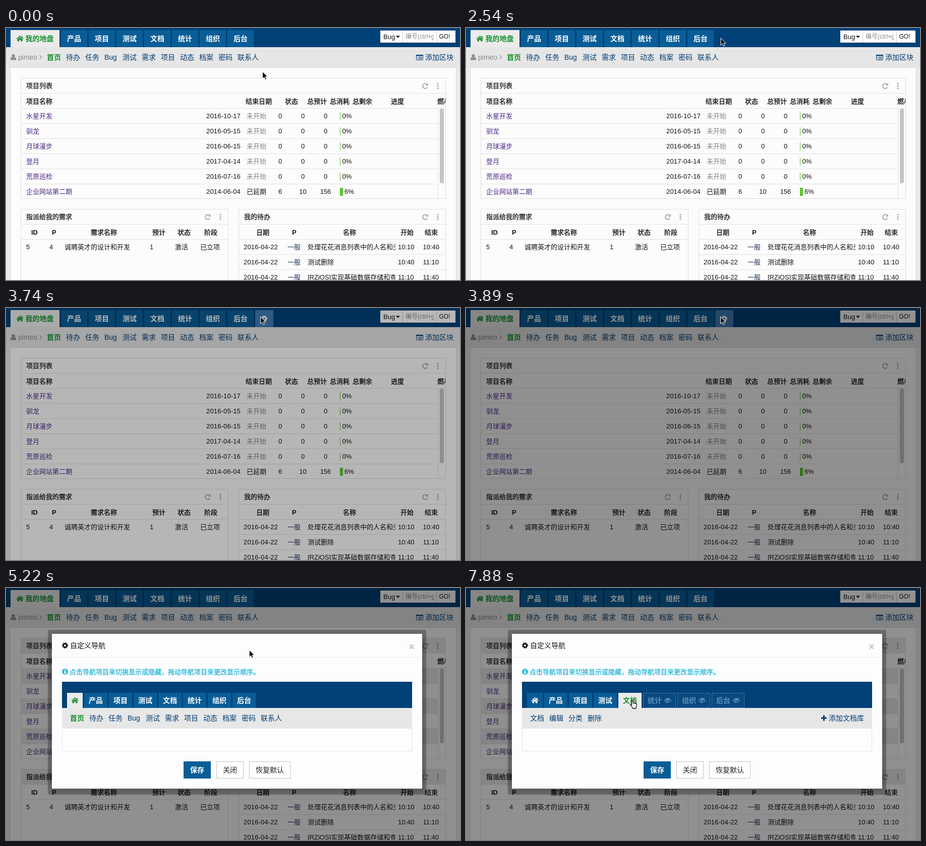
An HTML page that plays this animation: 900 by 500 pixels, repeating every 8 s.

```html
<!DOCTYPE html>
<html lang="zh-CN">
<head>
<meta charset="utf-8">
<title>自定义导航</title>
<style>
html, body { margin: 0; width: 100%; height: 100%; overflow: hidden; background: #ebebeb; }
svg { display: block; width: 900px; height: 500px; }
text { font-family: "Liberation Sans", "Noto Sans CJK SC", "Noto Sans CJK", sans-serif; white-space: pre; }
</style>
</head>
<body>
<svg id="stage" viewBox="0 0 900 500" xmlns="http://www.w3.org/2000/svg"></svg>
<script>
const LOOP = 8000;
const NAVY = '#003d73', BLUE = '#085d97', GREEN = '#17912f', INK = '#141414', LINK = '#4b2a85';
const LINE = '#e2e2e2', ICON = '#a8a8a8';

// Drawing helpers; text is placed by its vertical centre.
const text = (x, y, s, fill = INK, size = 13, more = '') =>
  `<text x="${x}" y="${y + size * 0.37}" fill="${fill}" font-size="${size}" ${more}>${s}</text>`;
const bold = (x, y, s, fill = INK, size = 13) => text(x, y, s, fill, size, 'font-weight="700"');
const semi = (x, y, s, fill = INK, size = 13) => text(x, y, s, fill, size, `stroke="${fill}" stroke-width=".35"`);
const mid = (x, y, s) => text(x, y, s, INK, 13, 'text-anchor="middle"');
const date = (x, y, s) => text(x, y, s, INK, 13, 'letter-spacing=".15"');
const rect = (x, y, w, h, fill, more = '') =>
  `<rect x="${x}" y="${y}" width="${w}" height="${h}" fill="${fill}" ${more}/>`;
const frame = (x, y, w, h, stroke, fill = 'none', more = '') =>
  rect(x + 0.5, y + 0.5, w - 1, h - 1, fill, `stroke="${stroke}" ${more}`);
const hline = (x1, x2, y, c = LINE) => rect(x1, y, x2 - x1, 1, c);
const at = (x, y, body) => `<g transform="translate(${x} ${y})">${body}</g>`;
const path = (d, fill, more = '') => `<path d="${d}" fill="${fill}" ${more}/>`;
const ring = (r, c, w, more = '') => `<circle r="${r}" fill="none" stroke="${c}" stroke-width="${w}" ${more}/>`;

const home = (x, y, c) => at(x, y,
  path('M-7 .3L0-6 3.5-2.8V-5H5.3V-1.3L7 .3 6 1.4 0-4 -6 1.4zM-5 1.6L0-2.8 5 1.6V5.6H1.4V2.2H-1.4V5.6H-5z', c));
const gear = (x, y, c) => at(x, y, ring(3.4, c, 2.8) + ring(5.1, c, 2, 'stroke-dasharray="2.003"'));
const eye = (x, y, c) => at(x, y,
  path('M-6.5 0Q0-8 6.5 0Q0 8-6.5 0z', 'none', `stroke="${c}" stroke-width="1.3"`) +
  path('M-2.5 0a2.5 2.5 0 0 1 5-.3zM4-5.5L-3 5.5', c, `stroke="${c}" stroke-width="1.2"`));
const plus = (x, y, c) => at(x, y, path('M-5.5-1.5h4v-4h3v4h4v3h-4v4h-3v-4h-4z', c));
const circlePlus = (x, y, c) => at(x, y,
  `<circle r="6" fill="${c}"/>` + path('M-3.5-1h2.5v-2.5h2V-1h2.5v2H1v2.5h-2V1h-2.5z', '#fff'));
const person = (x, y, c, k = 1) => at(x, y, `<g transform="scale(${k})">` +
  `<circle cy="-2.8" r="3.2" fill="${c}"/>` + path('M-5.5 5.6V3Q-5.5.2-2.6 0 0 1.6 2.6 0 5.5.2 5.5 3V5.6z', c) + '</g>');
const people = (x, y, c) => person(x - 4.6, y - 2.2, c, 0.62) + person(x + 4.6, y - 2.2, c, 0.62) + person(x, y + 0.8, c, 0.92);
const tools = (x, y) => at(x, y,
  path('M4.2 2.6A4.9 4.9 0 1 1 3.6-3.2', 'none', `stroke="${ICON}" stroke-width="2"`) + path('M5.9-5.8V-.8H.9z', ICON)) +
  [-4.5, 0, 4.5].map(d => rect(x + 23.5, y + d - 1.4, 3, 2.8, ICON, 'rx=".8"')).join('');

// Lays out menu words in a row.
function menu(x, y, words, activeIndex) {
  return words.map((w, i) => {
    const s = i === activeIndex ? bold(x, y, w, GREEN, 14) : text(x, y, w, NAVY, 14);
    x += (w === 'Bug' ? 26 : w.length * 14) + 10;
    return s;
  }).join('');
}

const HOME_MENU = '首页 待办 任务 Bug 测试 需求 项目 动态 档案 密码 联系人'.split(' ');
const TABS = '产品 项目 测试 文档 统计 组织 后台'.split(' ');

function header() {
  let s = rect(0, 0, 900, 500, '#ebebeb') + rect(0, 0, 900, 38, '#004178') + rect(0, 38, 900, 40, '#e6e6e6');
  s += rect(9, 4, 97, 34, '#ebebeb') + home(27.5, 21, GREEN) + bold(38.5, 21, '我的地盘', GREEN, 14);
  TABS.forEach((w, i) => {
    const x = 109 + i * 55;
    s += rect(x, 4, 52, 34, BLUE) + bold(x + 12, 21, w, '#fff', 14);
  });
  s += `<g id="gearTab">${rect(494, 4, 36, 34, '#3d7cb4')}${gear(512, 21, '#fff')}</g>`;
  s += rect(742, 5, 149, 24, '#fff') + rect(786, 5, 1, 24, '#ccc') + rect(853, 5, 1, 24, '#ccc');
  s += text(748, 17, 'Bug') + path('M773 15.5h8l-4 4.2z', INK) + text(858.5, 17, 'GO!', INK, 12);
  s += `<g clip-path="url(#search)">${text(792, 17, '编号(ctrl+g)', '#8a8a8a', 12)}</g>`;
  s += person(14.5, 58, '#8c8c8c') + text(24, 58, 'pimeo', '#8a8a8a', 14) +
    path('M66.5 54l4 4.2-4 4.2', 'none', 'stroke="#999" stroke-width="1.3"');
  s += menu(81, 58, HOME_MENU, 0);
  s += frame(813, 53, 14, 11, NAVY, '#fff', 'rx="1"') + rect(813, 53, 14, 2.5, NAVY) +
    [57, 59, 61].map(y => rect(815, y, 1.5, 1, NAVY) + rect(817.5, y, 7.5, 1, NAVY)).join('');
  return s + text(831, 58, '添加区块', NAVY, 14);
}

function panel(x, y, w, h, title) {
  return frame(x, y, w, h, '#dedede', '#fcfcfc') + hline(x, x + w, y + 30) + hline(x, x + w, y + 60) +
    semi(x + 11, y + 15, title, '#222') + tools(x + w - 41, y + 16);
}
const heads = (y, list) => list.map(([x, s]) => (/[A-Z]/.test(s) ? bold : semi)(x, y, s)).join('');

function projects() {
  let s = panel(29, 99, 843, 240, '项目列表');
  s += `<g clip-path="url(#wide)">` + heads(145, [[40, '项目名称'], [475, '结束日期'], [553, '状态'],
    [597, '总预计'], [642, '总消耗'], [687, '总剩余'], [763, '进度'], [855, '燃尽图']]) + '</g>';
  const rows = [['水星开发', '2016-10-17'], ['驯龙', '2016-05-15'], ['月球漫步', '2016-06-15'],
    ['登月', '2017-04-14'], ['荒原巡检', '2016-07-16'], ['企业网站第二期', '2014-06-04']];
  rows.forEach(([name, day], i) => {
    const y = 174 + i * 30, late = i === 5;
    s += text(40, y, name, LINK) + date(397, y, day);
    s += text(477, y, late ? '已延期' : '未开始', late ? INK : '#858585');
    (late ? [6, 10, 156] : [0, 0, 0]).forEach((n, k) => s += mid(543.5 + k * 45, y, n));
    s += rect(662, y - 7, late ? 6 : 1, 16, '#5bc72f') + text(late ? 671 : 666.5, y, late ? '6%' : '0%');
    if (!late) s += hline(30, 856, y + 15);
  });
  return s + rect(856, 160, 1, 178, LINE) + rect(860, 160, 8, 148, '#c4c4c4', 'rx="3.5"');
}

function stories() {
  return panel(29, 359, 412, 160, '指派给我的需求') +
    heads(405, [[50, 'ID'], [91, 'P'], [168, '需求名称'], [290, '预计'], [340, '状态'], [393, '阶段']]) +
    [[40, '5'], [86, '4'], [116, '诚聘英才的设计和开发'], [285, '1'], [335, '激活'], [385, '已立项']]
      .map(([x, w]) => text(x, 434, w)).join('');
}

function todos() {
  let s = panel(461, 359, 411, 160, '我的待办') +
    heads(405, [[496, '日期'], [567, 'P'], [668, '名称'], [782, '开始'], [830, '结束']]);
  const rows = [['处理花花消息列表中的人名和头像', '10:10', '10:40'], ['测试删除', '10:40', '11:10'],
    ['[RZiOS]实现基础数据存储和查询', '11:10', '11:40']];
  rows.forEach(([name, from, to], i) => {
    const y = 434 + i * 30;
    s += date(471, y, '2016-04-22') + text(558, y, '一般', '#1b2f55') + text(777, y, from) + text(826.5, y, to) +
      `<g clip-path="url(#todo)">${text(598, y, name)}</g>` + hline(462, 871, y + 15);
  });
  return s;
}

// Title bars and odd rows stand out while the page is dimmed.
const stripes = () => [100, 160, 220, 280].map(y => rect(30, y, y > 100 ? 826 : 841, 29, '#000')).join('') +
  rect(30, 360, 410, 29, '#000') + rect(462, 360, 409, 29, '#000');

function dialog() {
  let s = rect(83, 83, 750, 327, '#000', 'opacity=".25" rx="3"') +
    rect(88, 92, 740, 314, '#000', 'opacity=".15" filter="url(#soft)"');
  s += rect(91, 91, 734, 307, '#fcfdff') + hline(91, 825, 137, '#e4e6e8');
  s += gear(117, 114, INK) + text(127, 114, '自定义导航', INK, 14);
  s += `<g id="spinner">${at(207, 114, ring(5, '#aaa', 2.2, 'stroke-dasharray="1.9 2.027"'))}</g>`;
  s += path('M800 112.5l8 8m0-8l-8 8', 'none', 'stroke="#c9c9c9" stroke-width="2.6"');
  s += at(117, 166, '<circle r="6" fill="#2db7d6"/>' + path('M-1.2-4h2.4v2h-2.4zM-2-1h3.2v3.4h1V4h-4.2V2.4h1V.6h-1z', '#fff'));
  s += semi(126, 166, '点击导航项目来切换显示或隐藏，拖动导航项目来更改显示顺序。', '#2db7d6');
  s += frame(111, 186, 694, 138, '#e2e4e6') + rect(111, 186, 694, 52, '#004178') + rect(111, 238, 694, 41, '#e7e7e7');
  s += '<g id="nav"></g>';
  s += rect(352, 344, 54, 34, BLUE) + bold(365, 361, '保存', '#fff', 14);
  s += frame(417, 344, 54, 34, '#c4c4c4', '#fff') + text(430, 361, '关闭', '#222', 14);
  return s + frame(482, 344, 82, 34, '#c4c4c4', '#fff') + text(495, 361, '恢复默认', '#222', 14);
}

// Second-level menus shown inside the dialog.
const SUB = {
  '首页': HOME_MENU,
  '后台': ['首页', '扩展', '自定义', '发信', '备份', '安全', '定时'],
  '组织': ['用户', '部门', '权限', '公司', '动态'],
  '统计': ['产品', '项目', '测试', '组织'],
  '文档': ['文档', '编辑', '分类', '删除']
};
const ACTIONS = {
  '组织': [[557, plus, '添加用户', 567], [638, circlePlus, '批量添加', 648], [721.5, people, '添加分组', 733]],
  '文档': [[709.5, plus, '添加文档库', 719]]
};

function navPreview(active, hidden) {
  const onHome = active === '首页';
  let s = rect(121, 208, 31, 30, onHome ? '#ebebeb' : BLUE) + home(136.5, 223, onHome ? GREEN : '#fff'), x = 155;
  for (const w of TABS) {
    const off = hidden.includes(w), on = w === active, width = off ? 65 : 46;
    const ink = off ? (on ? '#15856f' : '#5c8eba') : on ? GREEN : '#fff';
    if (off && !on) s += frame(x, 208, width, 30, '#5c8eba', '#08497f', 'stroke-dasharray="3 2"');
    else s += rect(x, 208, width, 30, off ? '#91adca' : on ? '#ebebeb' : BLUE);
    s += bold(x + 9, 223, w, ink, 14);
    if (off) s += eye(x + 49, 223, ink);
    x += width + 3;
  }
  s += menu(127, 258, SUB[active], onHome ? 0 : -1);
  for (const [ix, icon, label, tx] of ACTIONS[active] || []) s += icon(ix, 258, NAVY) + text(tx, 258, label, NAVY, 14);
  return s;
}

const clip = (id, x, y, w, h) => `<clipPath id="${id}">${rect(x, y, w, h, '#000')}</clipPath>`;
const ARROW = 'M0 0V14.2L3.3 11.2 5.4 16.2 7.9 15.1 5.8 10.3H10.2z';
const HAND = 'M3.6 9.8V2.3Q3.6.7 5 .7T6.4 2.3V6.3Q8 5.3 8.7 6.9 10.3 6 11 7.6 13.2 7.2 13.2 9.3V11.8Q13.2 13.8 12 15V17H5.7Q5.4 15.2 4 13.8L1 10.3Q.3 8.5 1.8 8.3z';
const stage = document.getElementById('stage');
stage.innerHTML = '<defs>' + clip('search', 787, 5, 61, 24) + clip('wide', 30, 130, 841, 30) + clip('todo', 598, 420, 174, 80) +
  '<filter id="soft"><feGaussianBlur stdDeviation="6"/></filter></defs>' +
  header() + frame(8, 78, 885, 440, '#d6d6d6', '#fcfcfc') + projects() + stories() + todos() +
  `<g id="stripes">${stripes()}</g><g id="shade">${rect(0, 0, 900, 500, '#000')}</g><g id="dialog">${dialog()}</g>` +
  `<g id="cursor">${path(ARROW, '#111', 'id="arrow" stroke="#fff"')}` +
  path(HAND, '#fff', 'id="hand" stroke="#111" stroke-width="1.3"') + '</g>';

const el = Object.fromEntries([...stage.querySelectorAll('g[id], path[id]')].map(n => [n.id, n]));
const show = (node, on) => node.setAttribute('visibility', on ? 'visible' : 'hidden');
const fade = (node, opacity) => node.setAttribute('opacity', opacity);
// Last value whose start time has passed.
const pick = (t, list) => list.filter(([start]) => t >= start).pop()[1];

// Pointer moves: start, last step, number of steps, end point.
const MOVES = [[750, 1640, 7, 507.5, 21.5], [2390, 2540, 2, 505, 20], [3140, 3440, 3, 501, 17], [3740, 3740, 1, 504.5, 17],
  [4780, 5810, 8, 460, 229], [5960, 6250, 3, 402, 230], [6400, 6840, 4, 370, 228], [7140, 7880, 6, 325, 222]];

function pointer(t) {
  let x = 508.5, y = 86.5;
  for (const [from, to, steps, ex, ey] of MOVES) {
    if (t < from) break;
    const step = steps > 1 ? Math.floor((t - from) / (to - from) * (steps - 1) + 0.03) + 1 : 1;
    const p = Math.min(1, step / steps), e = p * p * (3 - 2 * p);
    x += (ex - x) * e;
    y += (ey - y) * e;
  }
  return [x, y];
}

const GEAR = [[0, 0], [3140, 0.4], [3290, 0.8], [3440, 1], [5080, 0]];
const SHADE = [[0, 0], [3740, 0.28], [3890, 0.43]];
const DIALOG = [[0, 0], [4040, 0.5], [4190, 1]];
const ACTIVE = [[0, '首页'], [5670, '后台'], [6110, '组织'], [6550, '统计'], [7730, '文档']];
const HIDDEN = [[0, ''], [5960, '后台'], [6250, '组织后台'], [7140, '统计组织后台']];
let navState;

function draw(t) {
  const open = pick(t, DIALOG);
  fade(el.gearTab, pick(t, GEAR));
  fade(el.shade, pick(t, SHADE));
  fade(el.stripes, open * 0.07);
  fade(el.dialog, open);
  el.dialog.setAttribute('transform', `translate(0 ${(open - 1) * 24})`);
  show(el.spinner, t < 4340);

  const active = pick(t, ACTIVE), hidden = pick(t, HIDDEN);
  if (navState !== active + hidden) {
    navState = active + hidden;
    el.nav.innerHTML = navPreview(active, hidden);
  }

  const hand = (t >= 3140 && t < 3740) || t >= 5520;
  show(el.hand, hand);
  show(el.arrow, !hand);
  el.cursor.setAttribute('transform', `translate(${pointer(t).join(' ')})`);
}

const start = performance.now();
function tick() {
  draw((performance.now() - start) % LOOP);
  requestAnimationFrame(tick);
}
tick();
</script>
</body>
</html>
```
